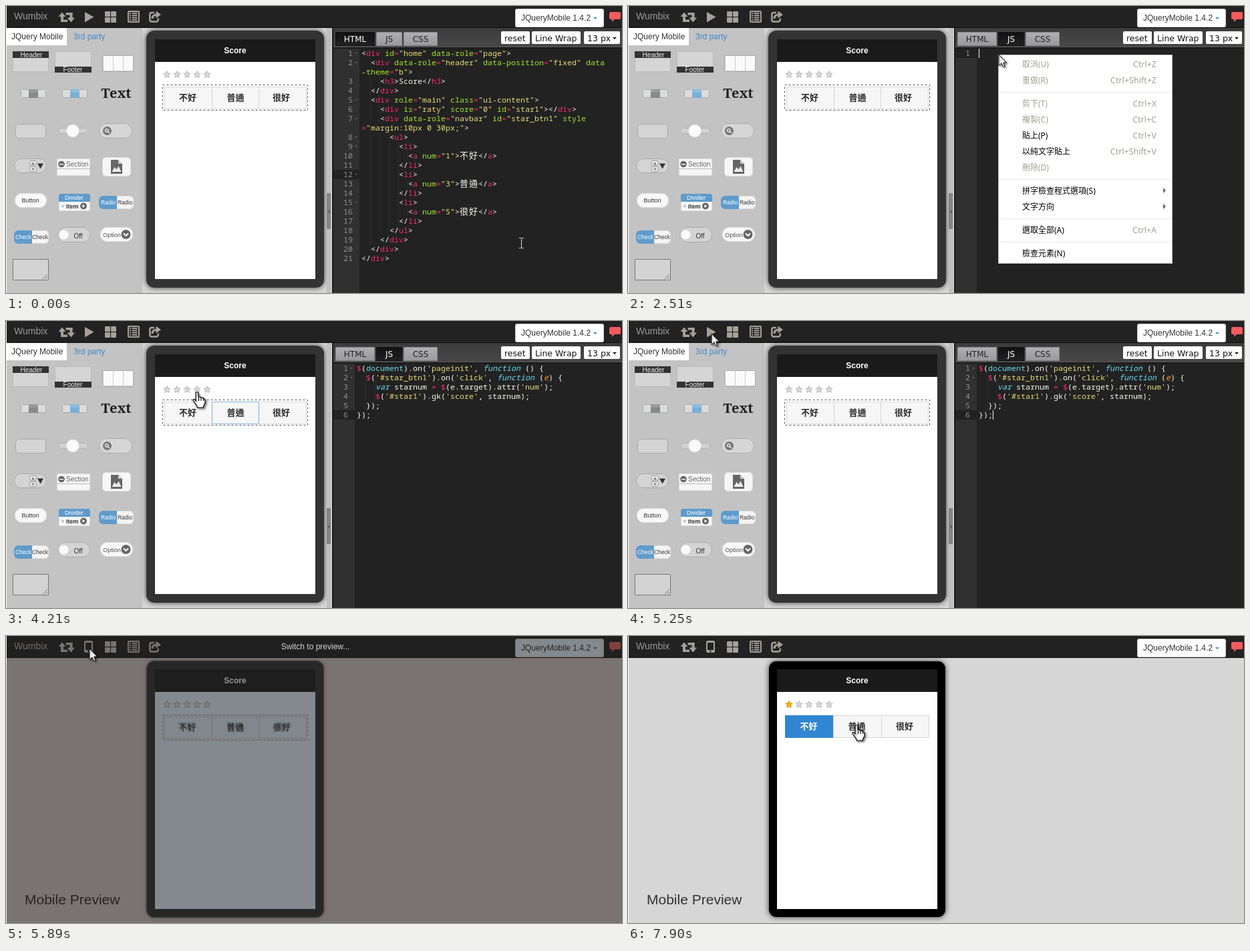
Animation, 922 px wide and 431 px high, one loop 8000 ms. Source, as an HTML page with a canvas:

```html
<!DOCTYPE html>
<html lang="zh-Hant">
<head>
<meta charset="utf-8">
<title>Score demo</title>
<style>
html, body { margin: 0; width: 100%; height: 100%; overflow: hidden; background: #d6d6d6; }
canvas { display: block; width: 922px; height: 431px; }
</style>
</head>
<body>
<canvas id="stage" width="922" height="431"></canvas>
<script>
const W = 922, H = 431, LOOP = 8000, STEP = 60;
const screen2d = document.getElementById('stage').getContext('2d');
let g = screen2d;

const SANS = '"Liberation Sans", Arial, sans-serif';
const WIDE = '"DejaVu Sans", Verdana, sans-serif';
const CJK = '"Noto Sans CJK TC", "Noto Sans CJK JP", sans-serif';
const MENU = '"Noto Sans", "Noto Sans CJK TC", "Noto Sans CJK JP", sans-serif';
const MONO = '11.667px "Noto Sans Mono", monospace';

const LIGHT = { bg: '#d6d6d6', bar: '#222', brand: '#999', icon: '#a3a199', button: '#fff', label: '#333',
  caret: '#428bca', chat: '#f55c5c', frame: '#333', head: '#1a1a1a', title: '#fff', screen: '#fff',
  nav: '#f6f6f6', line: '#d6d6d6', ink: '#2b2b2b', star: '#d6d6d6', starLine: '#bcbcbc', note: '#333' };
const PREVIEW = { ...LIGHT, frame: '#000' };
const DIM = { bg: '#635b59', bar: '#202020', brand: '#6b605c', icon: '#6d6866', button: '#656c70', label: '#222',
  caret: '#333', chat: '#643c30', frame: '#313131', head: '#202020', title: '#777b7e', screen: '#656c73',
  nav: '#656c73', line: '#635552', ink: '#222', star: '#656c73', starLine: '#5e4b46', note: '#262322' };

// Drawing helpers
function box(x, y, w, h, fill, r = 0, line) {
  if (fill) {
    g.fillStyle = fill;
    g.beginPath(); g.roundRect(x, y, w, h, r); g.fill();
  }
  if (line) {
    g.strokeStyle = line; g.lineWidth = 1;
    g.beginPath(); g.roundRect(x + .5, y + .5, w - 1, h - 1, r); g.stroke();
  }
}
function poly(points, fill, line, width = 1) {
  g.beginPath();
  points.forEach(([x, y]) => g.lineTo(x, y));
  g.closePath();
  if (fill) { g.fillStyle = fill; g.fill(); }
  if (line) { g.strokeStyle = line; g.lineWidth = width; g.lineJoin = 'round'; g.stroke(); }
}
function disc(x, y, r, fill, line) {
  g.beginPath(); g.arc(x, y, r, 0, 7);
  g.fillStyle = fill; g.fill();
  if (line) { g.strokeStyle = line; g.lineWidth = 1; g.stroke(); }
}
function text(s, x, y, font, color, align = 'left') {
  g.font = font; g.fillStyle = color; g.textAlign = align;
  g.fillText(s, x, y);
}
const down = (x, y, r, fill) => poly([[x - r, y], [x + r, y], [x, y + r]], fill);
function fade(top, bottom, y, h) {
  const f = g.createLinearGradient(0, y, 0, y + h);
  f.addColorStop(0, top); f.addColorStop(1, bottom);
  return f;
}

function topBar(c, preview) {
  box(1, 0, W - 1, 33, c.bar);
  box(1, 32, W - 1, 1, '#111');
  text('Wumbix', 12, 20, '14px ' + SANS, c.brand);
  const i = c.icon;
  poly([[78.5, 16], [84, 9.5], [89.5, 16]], i);
  box(82, 15, 4, 9, i); box(82, 20.5, 10, 3.5, i);
  poly([[91.5, 17.5], [103, 17.5], [97.3, 24.5]], i);
  box(95.5, 10, 4, 9, i); box(89.5, 10, 10, 3.5, i);
  if (preview) {
    box(117, 7, 13, 18, i, 2.5); box(119, 10, 9, 11, c.bar); disc(123.5, 23, 1.2, c.bar);
  } else poly([[118, 9], [131.5, 16.5], [118, 24.5]], i);
  for (const x of [148, 157]) for (const y of [8, 17]) box(x, y, 8, 8, i, 1);
  box(182, 7, 18, 18, i, 2); box(184, 9, 14, 14, c.bar);
  for (let y = 10; y < 22; y += 3.3) { box(185, y, 2, 2, i); box(188.5, y, 8, 2, i); }
  g.strokeStyle = i; g.lineWidth = 2.5;
  g.beginPath(); g.moveTo(222, 10); g.lineTo(218, 10);
  g.quadraticCurveTo(215.3, 10, 215.3, 13); g.lineTo(215.3, 20.5);
  g.quadraticCurveTo(215.3, 23.5, 218, 23.5); g.lineTo(225, 23.5);
  g.quadraticCurveTo(228, 23.5, 228, 18.5); g.stroke();
  poly([[224.5, 7.5], [232, 13], [224.5, 18.5]], i);
  g.lineWidth = 3;
  g.beginPath(); g.moveTo(219, 19); g.quadraticCurveTo(219, 13, 226, 13); g.stroke();
  box(762, 4, 133, 28, c.button, 3.5, c === DIM ? '#635b59' : '#ccc');
  text('JQueryMobile 1.4.2', 771, 22, '12px ' + SANS, c.label);
  down(882, 17, 3, c.caret);
  box(903, 9, 17, 11, c.chat, 2);
  poly([[907, 19], [912, 19], [907, 24]], c.chat);
}

const tiny = (s, x, y, color = '#333', align = 'center', size = 9) => text(s, x, y, size + 'px ' + SANS, color, align);
function pair(x, y, label) {
  box(x, y, 52, 20, '#f4f4f4', 6, '#ddd');
  box(x, y, 27, 20, '#5f9bcb', [6, 0, 0, 6]);
  tiny(label, x + 14, y + 13, '#fff', 'center', 8.5); tiny(label, x + 39, y + 13, '#333', 'center', 8.5);
}

function palette() {
  box(1, 33, 203, 398, '#c3c3c3');
  box(1, 33, 90, 26, '#fff');
  text('JQuery Mobile', 8, 50, '12px ' + SANS, '#333');
  text('3rd party', 101, 50, '12px ' + SANS, '#428bca');

  box(10, 68, 54, 31, '#d5d5d5', 0, '#bbb'); box(10, 68, 54, 10, '#333');
  tiny('Header', 38, 77, '#eee', 'center', 10);
  box(73, 68, 55, 32, '#d5d5d5', 0, '#bbb'); box(73, 91, 55, 9, '#333');
  tiny('Footer', 100, 99, '#eee', 'center', 10);
  box(144, 74, 47, 25, '#ccc', 1, '#aaa');
  for (const x of [146, 161, 176]) box(x, 75, 14, 22, '#fafafa');

  for (const [x, fill] of [[22, '#858b86'], [84, '#79b0d8']]) {
    box(x, 125, 38, 13, '#dcdcdc', 2, '#aaa');
    box(x + 12, 125, 14, 13, fill); box(x + 12, 125, 14, 5, 'rgba(255,255,255,.15)');
  }
  text('Text', 165, 138, '900 20px "Noto Serif", serif', '#1d1d1d', 'center');

  box(14, 177, 46, 22, '#d4d4d4', 5, '#a8a8a8');
  box(78, 183, 45, 9, '#d2d2d2', 4, '#b0b0b0'); disc(100, 187.5, 9.5, '#fafafa', '#ddd');
  box(139, 176, 50, 23, '#d6d6d6', 11, '#a8a8a8'); disc(151.5, 187.5, 6.5, '#777');
  g.strokeStyle = '#eee'; g.lineWidth = 1.3;
  g.beginPath(); g.arc(150.8, 186.8, 2.2, 0, 7); g.moveTo(152.5, 188.5); g.lineTo(155, 191); g.stroke();

  box(12, 229, 49, 22, '#d4d4d4', 11, '#a8a8a8');
  box(35, 232, 11, 8, '#e6e6e6', 1, '#999'); box(35, 241, 11, 8, '#e6e6e6', 1, '#999');
  poly([[38, 238], [43, 238], [40.5, 235]], '#666'); down(40.5, 244, 2.5, '#666');
  poly([[47, 236.5], [56, 236.5], [51.5, 244.5]], '#333');
  box(76, 229, 50, 26, '#f6f6f6', 3, '#ddd'); box(76, 244, 50, 1, '#bbb');
  disc(83, 237.5, 4.8, '#666'); box(80, 237, 6, 1.4, '#fff');
  tiny('Section', 90, 241, '#666', 'left', 10);
  box(144, 227, 43, 29, '#f6f6f6', 6, '#ddd');
  poly([[157, 231], [168, 231], [174, 237], [174, 252], [157, 252]], '#666');
  poly([[168, 231], [174, 237], [168, 237]], '#ccc');
  poly([[158.5, 249], [162.5, 242], [165.5, 245.5], [168.5, 240.5], [172.5, 249]], '#eee');

  box(13, 281, 48, 22, '#f8f8f8', 11, '#ddd'); tiny('Button', 36.5, 295);
  box(79, 282, 47, 26, '#f6f6f6', 3, '#ddd'); box(79, 282, 47, 12, '#5f9bcb', [3, 3, 0, 0]);
  tiny('Divider', 102, 291, '#fff');
  disc(85, 300.5, 2, '#a9c9e2'); text('Item', 90, 304, 'bold 9px ' + SANS, '#333');
  disc(116, 300.5, 5, '#666'); poly([[114.5, 298], [118.5, 300.5], [114.5, 303]], '#fff');
  pair(139, 285, 'Radio');

  pair(12, 337, 'Check');
  box(77, 332, 49, 23, '#d4d4d4', 11, '#a8a8a8'); disc(86.5, 343.5, 7, '#fafafa');
  tiny('Off', 108, 349, '#333', 'center', 10);
  box(141, 332, 49, 22, '#f8f8f8', 11, '#ddd'); tiny('Option', 158.5, 347, '#555');
  disc(179.5, 343, 7, '#666');
  g.strokeStyle = '#fff'; g.lineWidth = 2;
  g.beginPath(); g.moveTo(176, 341.5); g.lineTo(179.5, 345); g.lineTo(183, 341.5); g.stroke();

  box(10, 380, 54, 32, '#d3d3d3', 0, '#777');
  g.strokeStyle = '#777'; g.lineWidth = 1;
  g.beginPath(); g.moveTo(55, 410); g.lineTo(62, 403); g.moveTo(59, 410); g.lineTo(62, 407); g.stroke();
}

function star(x, y, fill, line) {
  const pts = [];
  for (let i = 0; i < 10; i++) {
    const r = i % 2 ? 2.8 : 5.4, a = i * Math.PI / 5 - Math.PI / 2;
    pts.push([x + r * Math.cos(a), y + r * Math.sin(a)]);
  }
  poly(pts, fill, line);
}

const CHOICES = ['不好', '普通', '很好'];
function phone(c, { editing = true, focus = -1, press = 0, score = 0 } = {}) {
  g.save();
  g.shadowColor = 'rgba(0,0,0,.75)'; g.shadowBlur = c === DIM ? 2 : 8;
  if (editing) box(210, 37, 266, 386, c.frame, 12);
  else box(211, 38, 264, 384, c.frame, 11);
  g.restore();
  box(223, 50, 240, 360, c.screen);
  box(223, 50, 240, 34, c.head);
  text('Score', 343, 71, 'bold 12px ' + SANS, c.title, 'center');
  for (let i = 0; i < 5; i++)
    i < score ? star(241 + 15 * i, 103, '#f9b000', '#dd8f10') : star(241 + 15 * i, 103, c.star, c.starLine);

  const [y, h, edges, mids] = editing
    ? [121, 34, [237, 308, 378, 449], [272, 343.5, 412]]
    : [119, 34, [235, 307, 379, 450], [270.5, 342.5, 414]];
  box(edges[0], y, edges[3] - edges[0] + 1, h, c.nav, 0, c.line);
  box(edges[1], y, 1, h, c.line); box(edges[2], y, 1, h, c.line);
  if (press) {
    g.globalAlpha = press;
    box(235, 119, 72, 34, '#3186d1');
    g.globalAlpha = 1;
  }
  if (focus >= 0) box(edges[focus], y, edges[focus + 1] - edges[focus] + 1, h, null, 2, '#7fb2d6');
  CHOICES.forEach((s, i) => text(s, mids[i], y + 21, 'bold 13px ' + CJK, press > .6 && !i ? '#fff' : c.ink, 'center'));
  if (editing) {
    g.strokeStyle = c === DIM ? '#2a2a2a' : '#555'; g.lineWidth = 1;
    g.setLineDash([3, 3]); g.strokeRect(234.5, 118.5, 217, 38); g.setLineDash([]);
  }
}

// Code editor; rows starting with ~ continue the line above
const li = (n, s) => ['        <li>', `          <a num="${n}">${s}</a>`, '        </li>'];
const PAGE = ['<div id="home" data-role="page">',
  '  <div data-role="header" data-position="fixed" data', '~-theme="b">',
  '    <h3>Score</h3>', '  </div>', '  <div role="main" class="ui-content">',
  '    <div is="raty" score="0" id="star1"></div>',
  '    <div data-role="navbar" id="star_btn1" style', '~="margin:10px 0 30px;">', '      <ul>',
  ...li(1, '不好'), ...li(3, '普通'), ...li(5, '很好'),
  '      </ul>', '    </div>', '  </div>', '</div>'];
const SCRIPT = ["$(document).on('pageinit', function () {",
  "  $('#star_btn1').on('click', function (e) {",
  "    var starnum = $(e.target).attr('num');",
  "    $('#star1').gk('score', starnum);", '  });', '});'];

const PINK = '#f92672', CYAN = '#66d9ef', GOLD = '#e6db74', PALE = '#f8f8f2';
const grammar = rules => ({
  re: new RegExp(rules.map(r => `(${r[0]})`).join('|'), 'g'),
  styles: rules.map(r => r.slice(1))
});
const MARKUP = grammar([['"[^"]*"', GOLD], ['(?<=</?)\\w+', PINK], ['[a-z-]+(?==|$)', '#a6e22e'],
  ['=', PINK], ['[\\u4e00-\\u9fff]', PALE], ['\\w+|\\S', PALE]]);
const LOGIC = grammar([["'[^']*'", GOLD], ['\\b(?:function|var)\\b', CYAN, 'italic '], ['document', CYAN],
  ['(?<=function \\()\\w', '#fd971f', 'italic '], ['[$=]', PINK], ['\\w+|\\S', PALE]]);

function codeRow(row, x, y, { re, styles }) {
  let extra = 0;
  for (const m of row.matchAll(re)) {
    const [color, slant = ''] = styles[m.slice(1).findIndex(v => v !== undefined)];
    const wide = m[0] > '\u4e00';
    text(m[0], x + 7 * (m.index + extra), y, wide ? '13px ' + CJK : slant + MONO, color);
    if (wide) extra++;
  }
}

function code(rows, x, lang, active, fold) {
  box(490, 64, x - 493, 367, '#303030');
  box(490, 64 + 14 * active, x - 493, 14, '#222');
  let n = 0;
  rows.forEach((raw, i) => {
    const top = 64 + 14 * i, wrap = raw[0] === '~', row = wrap ? raw.slice(1) : raw;
    if (!wrap) {
      text(++n, x - 13, top + 11, MONO, '#8f908a', 'right');
      if (fold(row)) down(x - 8, top + 6, 2, '#66665f');
    }
    for (let k = 2; k <= row.search(/\S/); k += 2)
      for (let d = 0; d < 14; d += 2) box(x + 7 * k - 1, top + d, 1, 1, '#3b3b3b');
    codeRow(row, x, top + 11, lang);
  });
}

function tab(x, w, label, on, hot) {
  box(x, 39, w, 21, on ? fade('#111', '#222', 39, 21) : hot ? '#bcbcc0' : fade('#b0b0b4', '#98989c', 39, 21),
    [2, 2, 0, 0], on ? '#111' : '#888');
  text(label, x + w / 2, 54, '12px ' + WIDE, on ? '#fff' : '#222', 'center');
}
function tool(x, w, label) {
  box(x, 38, w, 19, '#fff', 2);
  text(label, x + 5, 53, '12.5px ' + WIDE, '#111');
}

function editor(t) {
  const js = t >= 1630;
  box(488, 33, 434, 398, '#222');
  box(488, 33, 434, 30, fade('#3c3c3c', '#484848', 33, 30));
  box(488, 61, 434, 1, '#5a5a5a'); box(488, 62, 434, 2, '#1a1a1a');
  box(488, 33, 2, 398, '#1a1a1a');
  tab(493, 59, 'HTML', !js);
  tab(554, 39, 'JS', t >= 1430, t >= 1030);
  tab(595, 51, 'CSS', false);
  tool(741, 43, 'reset'); tool(787, 73, 'Line Wrap'); tool(865, 54, '13 px');
  down(911, 47, 3, '#111');
  if (!js) return code(PAGE, 532, MARKUP, 13, r => !r.includes('</'));
  const pasted = t >= 3330;
  code(pasted ? SCRIPT : [''], 525, LOGIC, pasted ? 5 : 0, r => r.endsWith('{'));
  const hidden = [[2700, 3070], [3850, 4270], [4750, 5250]].some(([a, b]) => t >= a && t < b);
  if (!hidden) pasted ? box(546, 134, 1, 14, PALE) : box(525, 64, 1, 14, PALE);
}

const ITEMS = [[88, '取消(U)', 'Ctrl+Z'], [112, '重做(R)', 'Ctrl+Shift+Z'], [147, '剪下(T)', 'Ctrl+X'],
  [171, '複製(C)', 'Ctrl+C'], [195, '貼上(P)', 'Ctrl+V', 1], [219, '以純文字貼上', 'Ctrl+Shift+V', 1],
  [243, '刪除(D)', '', 0], [278, '拼字檢查程式選項(S)', '>', 1], [302, '文字方向', '>', 1],
  [337, '選取全部(A)', 'Ctrl+A', 1], [372, '檢查元素(N)', '', 1]];
function menu(alpha, hoverY) {
  g.globalAlpha = alpha;
  box(554, 73, 261, 314, '#fff', 0, '#bababa');
  for (const y of [129, 260, 319, 354]) box(555, y, 259, 1, '#e9e9e9');
  for (const [y, name, key, on] of ITEMS) {
    if (on && Math.abs(hoverY - y) < 12) box(555, y - 12, 259, 24, '#f0f4fb');
    text(name, 590, y + 4, '12px ' + MENU, on ? '#000' : '#a1a192');
    if (key === '>') poly([[801, y - 5], [805, y - 1], [801, y + 3]], '#666');
    else text(key, 791, y + 4, '12.5px ' + MENU, '#a1a192', 'right');
  }
  g.globalAlpha = 1;
}

// Pointer
const smooth = k => k * k * (3 - 2 * k), speedUp = k => k ** 1.4, slowDown = k => 1 - (1 - k) ** 1.8;
const MOVES = [[130, 910, 589, 66, smooth], [970, 1030, 572, 49, smooth], [1690, 2120, 555, 73, smooth],
  [2640, 3070, 608, 196, smooth], [3850, 4210, 286, 107, speedUp], [4270, 4630, 95, 14, slowDown],
  [4690, 4990, 125, 19, smooth], [6010, 6560, 264, 119, smooth], [6620, 6680, 270, 131, slowDown],
  [6740, 6740, 274, 131, smooth], [7530, 7900, 342, 134, smooth]];
// 1 / n, 2 / n ... 1, advancing once per STEP
const stepped = (t, from, n) => Math.max(0, Math.min(1, (Math.floor((t - from) / STEP) + 1) / n));

function pointerAt(t) {
  let x = 771, y = 356;
  for (const [from, to, x1, y1, ease] of MOVES) {
    if (t < from) break;
    const k = ease(stepped(t, from, Math.round((to - from) / STEP) + 1));
    x += (x1 - x) * k; y += (y1 - y) * k;
  }
  return [Math.round(x), Math.round(y)];
}
function pointer(t, x, y) {
  const overMenu = t >= 2320 && t < 3330;
  g.save();
  g.translate(x, y);
  if (!overMenu && x > 489) {
    g.globalCompositeOperation = 'difference';
    box(0, -6, 1, 13, '#fff');
    for (const e of [-8, 7]) { box(-3, e, 3, 1, '#fff'); box(1, e, 3, 1, '#fff'); }
    box(0, -7, 1, 1, '#fff');
  } else {
    g.shadowColor = 'rgba(0,0,0,.45)'; g.shadowBlur = 3; g.shadowOffsetX = g.shadowOffsetY = 2;
    if (!overMenu && x > 234 && x < 452 && y > 95 && y < 157) {
      poly([[-1.5, 0], [1, 0], [2, 1.5], [2, 7], [5, 7], [6, 8], [8.5, 8], [9.5, 9.5], [11.5, 10], [12, 12],
        [12, 16], [9.5, 21], [9.5, 23], [0, 23], [0, 21], [-3.5, 16], [-6, 12.5], [-5.5, 10.5], [-4, 10.5],
        [-2, 13], [-2, 1]], '#fff', '#000', 1.2);
      g.shadowColor = 'transparent';
      for (const i of [2, 5.5, 9]) box(i, 8, 1, 5, '#000');
    } else {
      poly([[0, 0], [0, 16.5], [4, 13], [6.5, 18.5], [9, 17.5], [6.7, 12], [11.5, 12]], '#fff', '#111');
    }
  }
  g.restore();
}

function page(c) {
  box(0, 0, W, H, '#fff');
  box(1, 33, W - 1, H - 33, c.bg);
  topBar(c, c !== LIGHT);
  if (c !== LIGHT) text('Mobile Preview', 28, 403, '21px ' + SANS, c.note);
}
function layer(draw) {
  const cv = document.createElement('canvas');
  cv.width = W; cv.height = H;
  g = cv.getContext('2d');
  draw();
  g = screen2d;
  return cv;
}
const workspace = layer(() => { page(LIGHT); palette(); });
const veil = layer(() => {
  page(DIM); phone(DIM);
  text('Switch to preview...', 463, 20, '12px ' + SANS, '#fff', 'center');
});
const preview = layer(() => page(PREVIEW));

function render(t) {
  const [x, y] = pointerAt(t);
  if (t < 5890) {
    g.drawImage(workspace, 0, 0);
    phone(LIGHT, { focus: t >= 4150 && t < 4270 ? 1 : -1 });
    const hot = t >= 3850 && t < 5510 && x > 478 && x < 490;
    box(480, 33, 8, 398, hot ? '#999' : '#c0c0c0'); box(487, 33, 1, 398, '#e0e0e0');
    box(480, 281, 6, 54, '#858585', 1); poly([[482, 309], [484.5, 306], [484.5, 312]], '#555');
    editor(t);
    if (t >= 2320 && t < 3330) menu(t < 3270 ? stepped(t, 2320, 3) : .5, t >= 2640 ? y : 0);
  } else {
    g.drawImage(preview, 0, 0);
    phone(PREVIEW, { editing: false, press: stepped(t, 7070, 2), score: t >= 7530 ? 1 : 0 });
  }
  const dim = t < 5890 ? stepped(t, 5510, 3) : 1 - stepped(t, 5890, 5);
  if (dim > 0) {
    g.globalAlpha = dim;
    g.drawImage(veil, 0, 0);
    g.globalAlpha = 1;
  }
  pointer(t, x, y);
}

const start = performance.now();
function tick() {
  render((performance.now() - start) % LOOP);
  requestAnimationFrame(tick);
}
tick();
</script>
</body>
</html>
```
